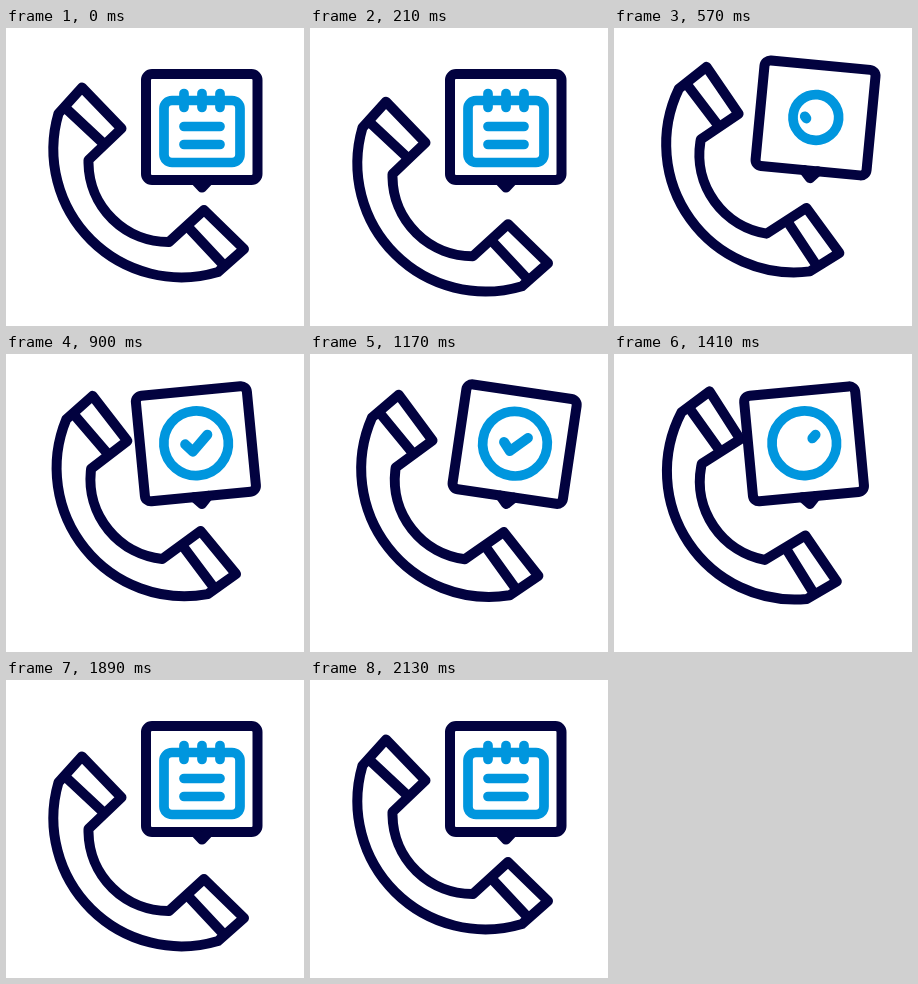
Write an HTML page that moves like this. It is 298 by 298 pixels and loops after 2250 ms.

```html
<!DOCTYPE html>
<html lang="en">
<head>
<meta charset="utf-8">
<title>Phone appointment</title>
<style>
html, body { margin: 0; width: 100%; height: 100%; overflow: hidden; background: #fff; }
svg { display: block; width: 100vw; height: 100vh; }
g, path { fill: none; stroke-linecap: round; stroke-linejoin: round; }
</style>
</head>
<body>
<svg viewBox="0 0 298 298">
  <g id="phone" stroke="#02023f" stroke-width="10">
    <path d="M76 59.5L52.5 85.5A128 128 0 0 0 212 244L238 221L198 182L163 214A80 80 0 0 1 82.5 135V132L115.5 100.5Z"/>
    <path d="M59.5 80L98 116M218 237.5L182 199"/>
  </g>
  <g id="bubble" stroke="#02023f" stroke-width="10">
    <rect x="140" y="46" width="111.5" height="106" rx="6"/>
    <path d="M189 152L196 159.5L203 152"/>
    <g stroke="#0096de">
      <g id="calendar">
        <rect x="-38" y="-27" width="76" height="62" rx="8"/>
        <path d="M-18 -34v14M0 -34v14M18 -34v14M-18 -1H18M-18 17H18"/>
      </g>
      <circle id="ring" cx="196" cy="98.5"/>
      <path id="check" d="M185 98.5L192 106.5L208 91" pathLength="1"/>
    </g>
  </g>
</svg>
<script>
const LOOP = 2250, STEP = 30;
const [phone, bubble, calendar, ring, check] =
  ['phone', 'bubble', 'calendar', 'ring', 'check'].map(id => document.getElementById(id));

const set = (node, attrs) => {
  for (const name in attrs) node.setAttribute(name, attrs[name]);
};
const show = (node, on) => set(node, { visibility: on ? 'visible' : 'hidden' });
const wave = (t, peak, period) => Math.cos(2 * Math.PI * (t - peak) / period);

// Eases from 0 to 1 between two times.
function ramp(t, start, end) {
  const p = Math.min(1, Math.max(0, (t - start) / (end - start)));
  return (1 - Math.cos(Math.PI * p)) / 2;
}

function place(node, y, turn, pivot) {
  set(node, { transform: `translate(0 ${y}) rotate(${turn} ${pivot})` });
}

function drawPhone(t) {
  const dip = ramp(t, 60, 300) - ramp(t, 1800, 2130);
  const lift = ramp(t, 300, 555) - ramp(t, 1440, 1800);
  const lean = ramp(t, 300, 660) - ramp(t, 1410, 1740);
  place(phone, 20.5 * dip - 31.5 * lift, lean * (8.3 + 3 * wave(t, 1410, 810)), '142 153');
}

function drawBubble(t) {
  const lift = ramp(t, 240, 600) - ramp(t, 1400, 1890);
  const sway = ramp(t, 390, 600) - ramp(t, 1350, 1890);
  // The swing stops at its left end, then settles upright.
  const swing = 1.5 + 7 * wave(Math.min(t, 1410), 645, 510);
  place(bubble, -9.5 * lift, sway * swing, '196 160');
}

// Shapes grow and shrink while their line weight stays the same.
function drawIcon(t) {
  const size = 1 - ramp(t, 240, 465) + ramp(t, 1560, 1750);
  show(calendar, size > 0.01);
  if (size > 0.01) {
    set(calendar, { transform: `translate(196 99.5) scale(${size})`, 'stroke-width': 9.7 / size });
  }

  const radius = 32.3 * (ramp(t, 465, 630) - ramp(t, 1420, 1580));
  show(ring, radius > 0.3);
  set(ring, { r: Math.max(0, radius), 'stroke-width': Math.min(9.7, Math.abs(radius) * 2) });

  const start = ramp(t, 1170, 1490), length = ramp(t, 525, 780) - start;
  show(check, length > 0.001);
  set(check, { 'stroke-dasharray': `${Math.max(length, 0.001)} 3`, 'stroke-dashoffset': -start });
}

function frame() {
  const t = Math.floor(performance.now() % LOOP / STEP) * STEP;
  drawPhone(t);
  drawBubble(t);
  drawIcon(t);
  requestAnimationFrame(frame);
}
frame();
</script>
</body>
</html>
```
